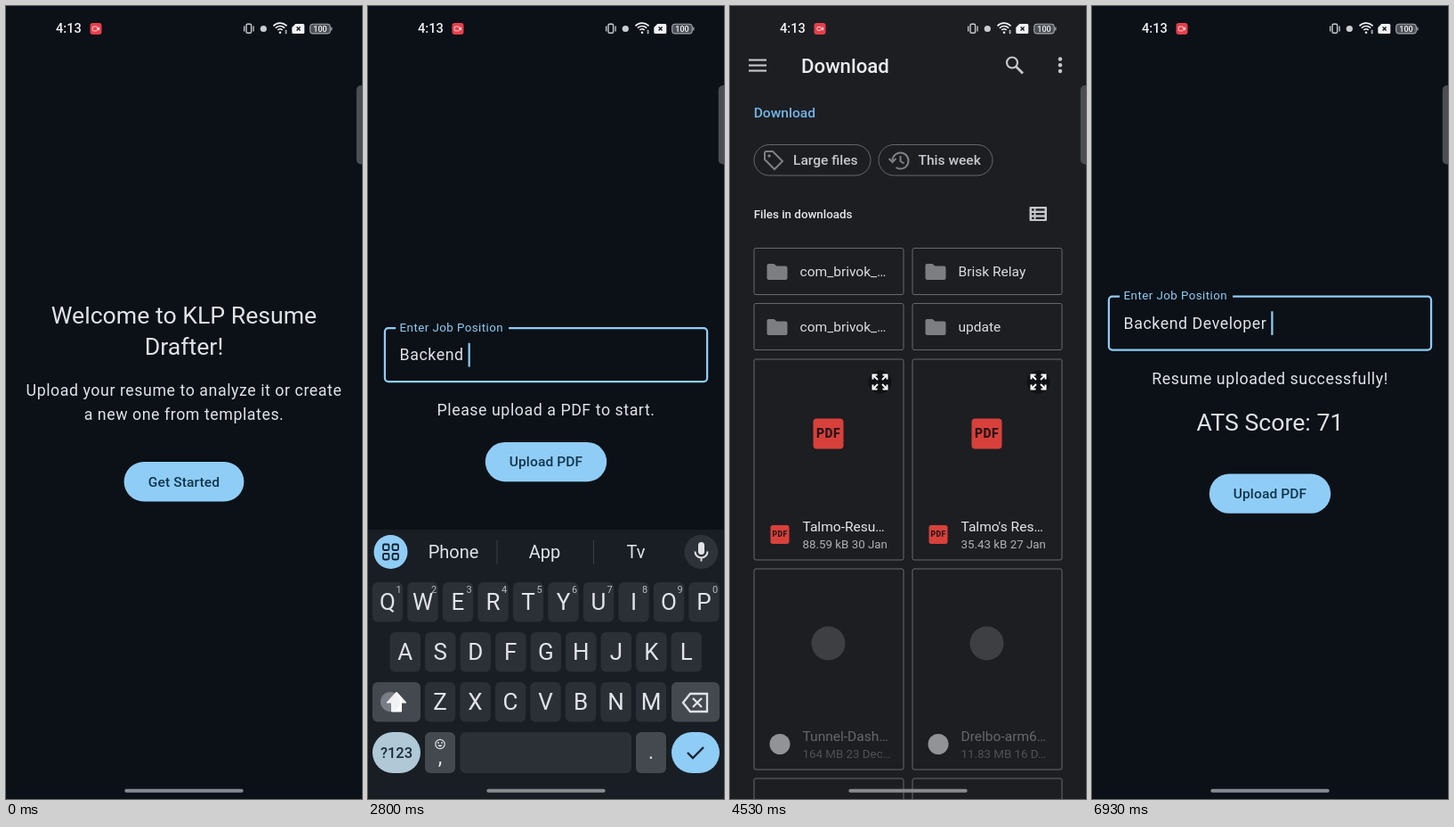
An HTML page with a canvas that plays this animation: 400x889 px, repeating every 7000 ms.

```html
<!DOCTYPE html>
<html lang="en">
<head>
<meta charset="utf-8">
<title>Resume app demo</title>
<style>
html, body { margin: 0; width: 100%; height: 100%; overflow: hidden; background: #0b1117; }
canvas { display: block; width: 400px; height: 889px; }
</style>
</head>
<body>
<canvas id="stage"></canvas>
<script>
const W = 400, H = 889, LOOP = 7000, FPS = 15;
const canvas = document.getElementById('stage');
const ratio = window.devicePixelRatio || 1;
canvas.width = W * ratio;
canvas.height = H * ratio;
const ctx = canvas.getContext('2d');

const BG = '#0b1117', BLUE = '#8fcdf6', INK = '#e0e3e8', DARK = '#10344b';
const KEY = '#2b3037', KEY_ALT = '#444950', PICKER = '#1d1e22';
const HEAD = 26.67, BODY = 17.78, LABEL = 15.56, SMALL = 13.33;

const clamp = v => Math.max(0, Math.min(1, v));
const span = (t, from, to) => clamp((t - from) / (to - from));
const easeOut = p => 1 - (1 - p) ** 3;

// ---- drawing helpers ----
// Vertical position is the middle of the text's line box.
function text(str, x, cy, size, color = INK, { align = 'left', weight = 400, gap = 0 } = {}) {
  ctx.font = `${weight} ${size}px Roboto, sans-serif`;
  ctx.letterSpacing = gap + 'px';
  ctx.textAlign = align;
  ctx.fillStyle = color;
  ctx.fillText(str, x, cy + size * 0.342);
}
const centered = (str, x, cy, size, color, opts) => text(str, x, cy, size, color, { align: 'center', ...opts });
const body = (str, cy) => centered(str, 200, cy, BODY, INK, { gap: 0.556 });

function box(x, y, w, h, r, fill, stroke, line = 1) {
  ctx.beginPath();
  ctx.roundRect(x, y, w, h, r);
  paint(fill, stroke, line);
}
function circle(x, y, r, fill, stroke, line = 1) {
  ctx.beginPath();
  ctx.arc(x, y, r, 0, 7);
  paint(fill, stroke, line);
}
function paint(fill, stroke, line) {
  if (fill) { ctx.fillStyle = fill; ctx.fill(); }
  if (stroke) { ctx.strokeStyle = stroke; ctx.lineWidth = line; ctx.stroke(); }
}
function shape(d, x, y, fill, stroke, line = 1.5) {
  ctx.save();
  ctx.translate(x, y);
  const path = new Path2D(d);
  if (fill) { ctx.fillStyle = fill; ctx.fill(path); }
  if (stroke) { ctx.strokeStyle = stroke; ctx.lineWidth = line; ctx.stroke(path); }
  ctx.restore();
}

// ---- typing script ----
const ROWS = ['qwertyuiop', 'asdfghjkl', 'zxcvbnm'];
const ROW_X = [22, 41.8, 81], ROW_Y = [668, 724, 780], PITCH = 39.5;
const SHIFTS = [1735, 2735];
const strokes = (word, start, step) => [...word].map((ch, i) => ({ ch, at: start + i * step }));
const typed = [...strokes('Backend ', 1900, 105), ...strokes('Developer ', 2850, 58)];

function keyPos(ch) {
  const row = ROWS.findIndex(r => r.includes(ch.toLowerCase()));
  if (row < 0) return [200, 837];
  return [ROW_X[row] + PITCH * ROWS[row].indexOf(ch.toLowerCase()), ROW_Y[row]];
}
const taps = [
  [190, 200, 533], [1330, 190, 391], [SHIFTS[0], 38, 782], [SHIFTS[1], 25, 780],
  [3470, 241, 519], [4380, 290, 510],
  ...typed.map(({ ch, at }) => [at, ...keyPos(ch)])
];
const typedAt = t => typed.filter(k => k.at <= t).map(k => k.ch).join('');

function drawTaps(t) {
  for (const [at, x, y] of taps) {
    if (t < at) continue;
    const a = 0.36 * (1 - span(t, at + 90, at + 150));
    if (a > 0) circle(x, y, 11, `rgba(215,220,226,${a})`);
  }
}

// ---- app screens ----
function button(label, y, x, w, t, tapAt, tapX) {
  box(x, y, w, 44.4, 22.2, BLUE);
  if (t >= tapAt && t < tapAt + 250) {
    ctx.save();
    ctx.clip();
    circle(tapX, y + 26, 20 + 120 * span(t, tapAt, tapAt + 130),
      `rgba(0,45,75,${0.13 * (1 - span(t, tapAt + 130, tapAt + 250))})`);
    ctx.restore();
  }
  centered(label, 200, y + 22.2, LABEL, DARK, { weight: 500, gap: 0.11 });
}

function welcome(t) {
  centered('Welcome to KLP Resume', 200, 346.6, HEAD);
  centered('Drafter!', 200, 382.2, HEAD);
  body('Upload your resume to analyze it or create', 431.1);
  body('a new one from templates.', 457.8);
  button('Get Started', 511.1, 132.6, 134.8, t, 190, 200);
}

function field(y, t) {
  const focused = t >= 1390;
  const line = focused ? 2.2 : 1.1;
  box(17.8 + line / 2, y + line / 2, 364.4 - line, 62.2 - line, 4, null, focused ? BLUE : '#8b9198', line);
  if (!focused) {
    text('Enter Job Position', 35.6, y + 31.1, BODY, '#c1c7ce', { gap: 0.556 });
    return;
  }
  ctx.fillStyle = BG;
  ctx.fillRect(31.1, y - 1, 127, 4.5);
  text('Enter Job Position', 35.6, y, SMALL, BLUE, { gap: 0.444 });
  const value = typedAt(t);
  text(value, 35.6, y + 31.1, BODY, INK, { gap: 0.556 });
  const blink = ((t - 6850) % 340 + 340) % 340 < 170;
  if (t < 3500 || blink) {
    const x = 35.6 + ctx.measureText(value).width;
    ctx.fillStyle = BLUE;
    ctx.fillRect(x, y + 17.8, 2.2, 26.7);
  }
}

const upload = { start: 4613, step: 18 };

function uploadScreen(t) {
  const percent = Math.floor((t - upload.start) / upload.step);
  const working = percent >= 0 && percent < 100;
  const done = percent >= 100;
  const extra = working ? 88.9 : done ? 71.1 : 0;
  const top = 360 - extra / 2;
  field(top, t);
  body(working || done ? 'Resume uploaded successfully!' : 'Please upload a PDF to start.', top + 93.3);
  if (working) {
    ctx.lineCap = 'round';
    ctx.beginPath();
    ctx.arc(200, 462.2, 20, -Math.PI / 2, -Math.PI / 2 + percent / 100 * Math.PI * 2);
    paint(null, BLUE, 4.4);
    ctx.lineCap = 'butt';
    body(`Processing... ${percent}%`, 497.8);
  }
  if (done) centered('ATS Score: 71', 200, 466.7, HEAD);
  button('Upload PDF', top + 128.9 + extra, 131.8, 136.4, t, 3470, 241);
}

// ---- keyboard ----
function toolbar() {
  const dim = '#5a5f66', lit = '#dfe3e9';
  box(74, 603, 18, 18, 4, null, dim, 2);
  circle(80, 609, 1.4, dim);
  circle(86, 609, 1.4, dim);
  shape('M-5 2Q0 7 5 2Z', 83, 612, dim);
  centered('GIF', 141.5, 612, 16, dim, { weight: 800, gap: 0.6 });
  for (let i = 0; i < 8; i++) {
    ctx.save();
    ctx.translate(200, 612);
    ctx.rotate(i * Math.PI / 4);
    ctx.fillStyle = lit;
    ctx.fillRect(-2.4, -9.6, 4.8, 4);
    ctx.restore();
  }
  circle(200, 612, 5.2, null, lit, 4);
  box(249, 603, 18, 18, 2, lit);
  circle(316, 612, 9.5, lit);
  for (const [x, y] of [[310, 611], [313, 606.5], [319, 606.5], [322, 611]]) circle(x, y, 1.5, '#1a1f26');
  circle(322, 618, 3.2, '#1a1f26');
}

function suggestions(value) {
  const word = value.split(' ').pop();
  const full = value.includes(' ') ? 'Developer' : 'Backend';
  const words = value.endsWith(' ')
    ? (full === 'Developer' && value.length > 8 ? ['for', 'in', 'with'] : ['Phone', 'App', 'Tv'])
    : [word, full, full + 's'];
  [96, 198.5, 301].forEach((x, i) => centered(words[i], x, 612, 20, INK));
  ctx.fillStyle = '#3a3f46';
  ctx.fillRect(144.5, 599, 1, 27);
  ctx.fillRect(253, 599, 1, 27);
}

function keyboard(t) {
  const value = typedAt(t);
  const upper = (t >= SHIFTS[0] && t < typed[0].at) || (t >= SHIFTS[1] && t < typed[8].at);
  ctx.fillStyle = '#191e25';
  ctx.fillRect(0, 587, W, H - 587);

  circle(25.5, 612, 19, BLUE);
  for (const x of [17, 27.5]) for (const y of [603.5, 614]) box(x, y, 6.5, 6.5, 1.5, null, '#11212e', 1.8);
  circle(374.5, 612, 19, '#2e3339');
  box(371, 601, 7, 14, 3.5, INK);
  shape('M-7 0A7 7 0 0 0 7 0M0 7V11', 374.5, 611.5, null, INK, 2);
  value ? suggestions(value) : toolbar();

  ROWS.forEach((row, r) => [...row].forEach((ch, i) => {
    const x = ROW_X[r] + PITCH * i, y = ROW_Y[r];
    box(x - 17.2, y - 22, 34.4, 44.5, 6, KEY);
    centered(upper ? ch.toUpperCase() : ch, x, y, 26, INK);
    if (r === 0) centered(String((i + 1) % 10), x + 12.5, 654.5, 11, '#b6bbc2');
  }));

  box(5, 758, 54, 44.5, 6, KEY_ALT);
  shape('M0 -11L11 1H5.5V11H-5.5V1H-11Z', 32, 780, upper ? '#fff' : null, upper ? '#fff' : INK, upper ? 1 : 2.2);
  box(341, 758, 54, 44.5, 6, KEY_ALT);
  shape('M-14 0L-6 -10H13V10H-6ZM-3 -5L7 5M7 -5L-3 5', 368, 781, null, INK, 2.3);

  box(5, 814, 54, 46, 23, '#b1c9d7');
  centered('?123', 32, 837, 16.5, '#1b2c38', { weight: 500 });
  box(64, 814, 34, 46, 6, KEY_ALT);
  circle(81, 827.5, 5.2, null, INK, 1.2);
  circle(79, 826, 0.9, INK);
  circle(83, 826, 0.9, INK);
  shape('M-2.8 0Q0 4 2.8 0Z', 81, 828.5, INK);
  centered(',', 81, 842, 23, INK);
  box(103.5, 814, 192.5, 46, 6, KEY);
  box(301, 814, 34, 46, 6, KEY_ALT);
  centered('.', 318, 836, 23, INK);
  box(341, 814, 54, 46, 23, BLUE);
  shape('M-9 0L-3 6L9 -6', 368, 837, null, '#10222f', 2.4);
}

// ---- file picker ----
const CARD = '#66686c', ICON = '#c6c8cc';

function pdfIcon(x, y, s) {
  box(x - s / 2, y - s / 2, s, s, s * 0.12, '#d8403b');
  centered('PDF', x, y, s * 0.41, '#2a1517', { weight: 900, gap: s * 0.015 });
}
function folder(x, y, name) {
  box(x + 0.5, y + 0.5, 168, 52, 2, null, CARD);
  shape('M2 0H8L11 2.5H21Q23 2.5 23 4.5V16Q23 18 21 18H2Q0 18 0 16V2Q0 0 2 0Z', x + 15, y + 18, '#7d7e81');
  text(name, x + 52, y + 27, LABEL, '#dcdde0');
}
function fileCard(x, y, name, info, isPdf) {
  box(x + 0.5, y + 0.5, 168, 225, 2, null, CARD);
  if (isPdf) {
    circle(x + 142, y + 26, 13, '#101114');
    for (let i = 0; i < 4; i++) {
      ctx.save();
      ctx.translate(x + 142, y + 26);
      ctx.rotate(i * Math.PI / 2);
      shape('M3 -8H8V-3M8 -8L2.5 -2.5', 0, 0, null, '#fff', 2);
      ctx.restore();
    }
    pdfIcon(x + 84, y + 84, 34);
    pdfIcon(x + 29.5, y + 197, 21);
  } else {
    circle(x + 84, y + 84, 19, '#3e3f42');
    circle(x + 29.5, y + 197, 11.5, '#929396');
  }
  text(name, x + 55, y + 188.5, LABEL, isPdf ? '#e6e7ea' : '#66676b');
  text(info, x + 55, y + 208, SMALL, isPdf ? '#b0b1b5' : '#505155');
}

function picker(t) {
  ctx.fillStyle = PICKER;
  ctx.fillRect(0, 0, W, H);
  for (const y of [60.5, 66.5, 72.5]) { ctx.fillStyle = ICON; ctx.fillRect(21, y - 1, 20, 2.1); }
  text('Download', 80, 67, 22.2, '#eceef1', { weight: 500 });
  circle(317, 63.5, 6, null, ICON, 2.2);
  shape('M0 0L7.5 7.5', 321.5, 68, null, ICON, 2.8);
  for (const y of [59.5, 66.3, 73]) circle(371, y, 2.2, ICON);
  text('Download', 26.7, 120, LABEL, '#72b4e6', { weight: 500 });

  box(27, 155.5, 131, 34.5, 17.2, null, CARD);
  shape('M-10 -8V-1L1 10L10 1L-1 -10H-8Q-10 -10 -10 -8Z', 49, 173, null, '#7e8084', 2);
  circle(44, 168, 1.7, '#7e8084');
  text('Large files', 71, 173, LABEL, '#c6c8cd', { weight: 500 });
  box(167, 155.5, 128, 34.5, 17.2, null, CARD);
  shape('M-8 0A9 9 0 1 1 -4 8M-12 -2L-8 2L-4 -2M1 -5V1L5 3.5', 190.5, 173, null, '#7e8084', 2);
  text('This week', 211.5, 173, LABEL, '#c6c8cd', { weight: 500 });

  text('Files in downloads', 26.7, 233.5, SMALL, '#e6e7ea', { weight: 500 });
  box(336.5, 225, 19.5, 16, 1, ICON);
  ctx.fillStyle = PICKER;
  for (const y of [227.3, 232, 236.7]) {
    ctx.fillRect(339, y, 2.6, 2.3);
    ctx.fillRect(343.5, y, 10, 2.3);
  }

  folder(26.5, 271, 'com_brivok_…');
  folder(204.5, 271, 'Brisk Relay');
  folder(26.5, 333, 'com_brivok_…');
  folder(204.5, 333, 'update');
  fileCard(26.5, 395.5, 'Talmo-Resu…', '88.59 kB 30 Jan', true);
  fileCard(204.5, 395.5, "Talmo's Res…", '35.43 kB 27 Jan', true);
  fileCard(26.5, 630.5, 'Tunnel-Dash…', '164 MB 23 Dec…', false);
  fileCard(204.5, 630.5, 'Drelbo-arm6…', '11.83 MB 16 D…', false);
  for (const x of [27, 205]) box(x, 866, 168, 60, 2, null, CARD);

  if (t >= 4380 && t < 4520) box(205, 396, 168, 225, 2, `rgba(255,255,255,${0.06 * (1 - span(t, 4440, 4520))})`);
}

// ---- system bars ----
function systemBars(t) {
  const white = '#f1f2f4', grey = '#c9ccd0';
  text('4:13', 56, 25.3, 14.6, white, { weight: 500 });
  box(94.5, 19, 13, 13, 3, '#e63f4d');
  const s = 0.9 + 0.1 * Math.cos(t / LOOP * Math.PI * 2 * 10);
  box(101 - 3.8 * s, 25.5 - 2.4 * s, 5.4 * s, 4.8 * s, 1, null, '#ffd9dc', 0.9);
  shape('M1.8 -.8L4 -2V2L1.8 .8Z', 101, 25.5, '#ffd9dc');

  box(270, 20.3, 5.6, 10, 1.4, null, grey, 1.4);
  ctx.fillStyle = grey;
  ctx.fillRect(267, 22.5, 1.3, 6);
  ctx.fillRect(277.4, 22.5, 1.3, 6);
  circle(289.3, 25.5, 3.6, grey);
  for (const r of [3.7, 7, 10.3]) {
    ctx.beginPath();
    ctx.arc(308, 29.5, r, -Math.PI * 0.76, -Math.PI * 0.24);
    paint(null, white, 1.7);
  }
  circle(308, 29.7, 1.3, white);
  shape('M-1.4 -.6L0 -2.4L1.4 -.6ZM-1.4 .6L0 2.4L1.4 .6Z', 314.6, 29, white);
  shape('M4 0H12.5Q14 0 14 1.5V10Q14 11 12.5 11H1.5Q0 11 0 9.5V4Z', 321.3, 20, white);
  shape('M-2 -2L2 2M2 -2L-2 2', 328.6, 25.6, null, '#15191f', 1.4);
  box(341.7, 20.3, 22.6, 10.6, 3.4, '#4b4f55', '#a7abb0', 1.1);
  ctx.fillStyle = '#a7abb0';
  ctx.fillRect(365.2, 23.8, 1.3, 3.6);
  centered('100', 353, 25.6, 9, white, { weight: 500 });

  box(393.8, 89, 12, 88.5, 5, '#4b4e53');
  box(133.3, 877.8, 133.4, 3.9, 2, '#878a8f');
}

// ---- timeline ----
function render(t) {
  ctx.setTransform(ratio, 0, 0, ratio, 0, 0);
  ctx.globalAlpha = 1;
  ctx.fillStyle = BG;
  ctx.fillRect(0, 0, W, H);

  const opened = easeOut(span(t, 3565, 3765)) - easeOut(span(t, 4640, 4840));
  if (opened < 1) {
    const fade = span(t, 630, 870);
    if (fade < 1) {
      ctx.globalAlpha = 1 - fade;
      welcome(t);
    }
    if (fade > 0) {
      ctx.globalAlpha = fade;
      uploadScreen(t);
    }
    ctx.globalAlpha = 1;
    const rise = easeOut(span(t, 1440, 1640));
    if (rise > 0 && t < 4000) {
      ctx.save();
      ctx.translate(0, 302 * (1 - rise));
      keyboard(t);
      ctx.restore();
    }
    const dim = 0.5 * (span(t, 3455, 3655) - span(t, 4640, 4840));
    ctx.fillStyle = `rgba(12,16,16,${dim})`;
    ctx.fillRect(0, 0, W, H);
  }
  if (opened > 0) {
    ctx.save();
    ctx.translate(W * (1 - opened), 0);
    picker(t);
    ctx.restore();
  }
  drawTaps(t);
  systemBars(t);
}

function tick() {
  const now = performance.now() % LOOP;
  const step = Math.floor((now + 5) * FPS / 1000) % (LOOP * FPS / 1000);
  render(step * 1000 / FPS);
  requestAnimationFrame(tick);
}
tick();
</script>
</body>
</html>
```
